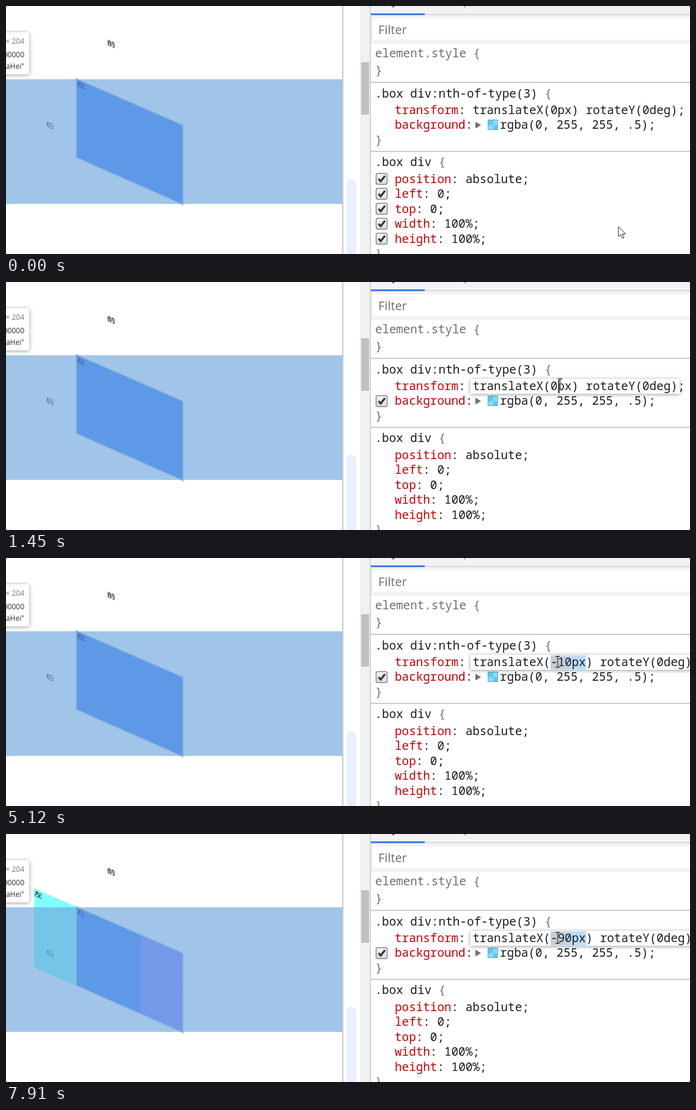
An HTML page for the animation above (8000 ms loop, 1119 px wide and 406 px high).

```html
<!DOCTYPE html>
<html lang="en">
<head>
<meta charset="utf-8">
<title>Moving a cube face in the style inspector</title>
<style>
html, body { margin: 0; width: 100%; height: 100%; overflow: hidden; background: #fff; }
svg { display: block; }
.code { font: 19.3px "Noto Sans Mono", "DejaVu Sans Mono", monospace; fill: #1c1c1c; }
.prop { fill: #c80000; }
.dim { fill: #6e6e6e; }
.ui { font-family: "Open Sans", "Noto Sans", sans-serif; }
.face { font: 16px "Noto Sans CJK SC", "Noto Sans CJK", sans-serif; }
.pop { filter: drop-shadow(0 1px 3px rgba(0, 0, 0, .4)); }

/* One 8 s clock; every change is a hard step. 1% = 80 ms */
.a { animation: 8s step-end infinite; }
.hover-low { animation-name: hover-low; }
.hover-top { animation-name: hover-top; }
.hover-bg { animation-name: hover-bg; }
.edit { animation-name: edit; }
.edit-box { animation-name: edit-box; }
.all { animation-name: all; }
.caret { animation-name: caret; }
.part { animation-name: part; }
.before { animation-name: before; }
.after { animation-name: after; }
.tip { animation-name: tip; }
.plane { animation-name: plane; }
.digits { animation-name: digits; }
.pointer { animation-name: pointer; }
.arrow { animation-name: arrow; }
.beam { animation-name: beam; }

@keyframes hover-low { 0% { opacity: 1 } 3.7125%, 100% { opacity: 0 } }
@keyframes hover-top { 0% { opacity: 0 } 3.7125% { opacity: 1 } 9.375%, 100% { opacity: 0 } }
@keyframes hover-bg { 0% { opacity: 0 } 3.7125%, 100% { opacity: 1 } }
@keyframes edit { 0% { opacity: 0 } 9.375%, 100% { opacity: 1 } }
@keyframes edit-box { 0% { width: 342px } 64%, 100% { width: 368px } }
@keyframes all { 0% { opacity: 0 } 9.375% { opacity: 1 } 17.375%, 100% { opacity: 0 } }
@keyframes caret { 0% { opacity: 0 } 17.375% { opacity: 1 } 20.25%, 100% { opacity: 0 } }
@keyframes part { 0% { opacity: 0 } 20.25%, 100% { opacity: 1 } }
@keyframes before { 0% { opacity: 1 } 64%, 100% { opacity: 0 } }
@keyframes after { 0% { opacity: 0 } 64%, 100% { opacity: 1 } }
@keyframes tip {
  0% { opacity: 0 } 33% { opacity: .5 } 33.875% { opacity: 1 }
  46.5% { opacity: .5 } 47.5%, 100% { opacity: 0 }
}
@keyframes plane {
  0% { transform: none }
  65% { transform: translate(-8.65px, -3.75px) }
  70.625% { transform: translate(-17.3px, -7.5px) }
  74.75% { transform: translate(-25.95px, -11.25px) }
  79.625% { transform: translate(-34.6px, -15px) }
  83.375% { transform: translate(-43.25px, -18.75px) }
  87.25% { transform: translate(-51.9px, -22.5px) }
  92.25% { transform: translate(-60.55px, -26.25px) }
  95.125%, 100% { transform: translate(-69.2px, -30px) }
}
@keyframes digits {
  0% { transform: none }
  70.625% { transform: translateY(-30px) }
  74.75% { transform: translateY(-60px) }
  78.5% { transform: translateY(-90px) }
  82.5% { transform: translateY(-120px) }
  87.25% { transform: translateY(-150px) }
  91.125% { transform: translateY(-180px) }
  95.125% { transform: translateY(-210px) }
  98.875%, 100% { transform: translateY(-240px) }
}
@keyframes pointer {
  0% { transform: translate(1002px, 361px) }
  .875% { transform: translate(996px, 345px) }
  1.825% { transform: translate(980px, 310px) }
  2.7625% { transform: translate(960px, 268px) }
  3.7125% { transform: translate(940px, 232px) }
  4.6625% { transform: translate(925px, 204px) }
  5.6125% { transform: translate(914px, 187px) }
  6.55% { transform: translate(907px, 175px) }
  7.5% { transform: translate(903.5px, 171px) }
  18.125% { transform: translate(906.5px, 167.5px) }
  26.125%, 100% { transform: translate(902.5px, 170px) }
}
@keyframes arrow { 0% { opacity: 1 } 4.6625%, 100% { opacity: 0 } }
@keyframes beam { 0% { opacity: 0 } 4.6625%, 100% { opacity: 1 } }
</style>
</head>
<body>
<svg width="1119" height="406" viewBox="0 0 1119 406">
  <defs>
    <linearGradient id="shade" x2="0" y2="1">
      <stop stop-color="#f6f6f6"/><stop offset="1" stop-color="#dcdcdc"/>
    </linearGradient>
    <g id="check">
      <rect x="-9" y="-9" width="18" height="18" rx="3" fill="url(#shade)" stroke="#858585" stroke-width="1.5"/>
      <path d="M-5 0L-1.5 4L5.5-5" fill="none" stroke="#333" stroke-width="3.2"/>
    </g>
    <path id="quad" d="M115 119L289.5 195V325L115 248Z"/>
    <path id="bar" d="M-3.5-9H-1L0-8L1-9H3.5M0-8V8M-3.5 9H-1L0 8L1 9H3.5"/>
  </defs>

  <!-- page preview -->
  <g class="face">
    <text transform="matrix(.87 .38 0 .645 65 185)" y="17">后</text>
    <g class="a plane">
      <use href="#quad" fill="#0ff" fill-opacity=".5"/>
      <text transform="matrix(.87 .38 0 .645 115 119)" y="17">左</text>
    </g>
    <use href="#quad" fill="#00f" fill-opacity=".5"/>
    <text transform="matrix(.87 .38 0 .645 115 119)" y="17">右</text>
    <text transform="matrix(.87 .38 0 .645 165 52)" y="17">前</text>
  </g>
  <rect y="120" width="550" height="204" fill="#6fa8dc" fill-opacity=".66"/>
  <use href="#quad" fill="none" stroke="#8ab4dc" stroke-opacity=".9" stroke-width="1.8"/>

  <g class="ui" font-size="12" text-anchor="end" fill="#333">
    <rect class="pop" x="-20" y="43" width="58" height="69" rx="3" fill="#fff"/>
    <text x="30" y="62" fill="#777">× 204</text>
    <text x="30" y="84">#000000</text>
    <text x="30" y="103">aHei"</text>
  </g>

  <!-- panel frame -->
  <rect x="550" width="2" height="406" fill="#c9c9c9"/>
  <rect x="557" y="283" width="16" height="140" rx="8" fill="#e9f0fd"/>
  <rect x="579" width="17" height="406" fill="#f1f1f1"/>
  <rect x="581" y="92" width="13" height="86" fill="#c1c1c1"/>
  <rect x="597" width="522" height="62" fill="#f3f3f3"/>
  <rect x="595.5" width="1.5" height="406" fill="#c8c8c8"/>
  <g class="ui" font-size="19" fill="#333">
    <text x="614" y="-2">Styles</text>
    <text x="707" y="-2" class="dim">Computed</text>
  </g>
  <path d="M597 14H1119" stroke="#ccc" stroke-width="1.5"/>
  <rect x="597" y="12" width="88" height="3" fill="#3b7fe8"/>
  <rect x="601" y="20" width="518" height="35" fill="#fff"/>
  <text class="ui" x="609" y="46" font-size="20" fill="#6e6e6e">Filter</text>
  <path d="M597 125H1119M597 238H1119" stroke="#ccc" stroke-width="2"/>

  <!-- rules -->
  <g class="code">
    <text x="604" y="84" class="dim" font-size="19.1">element.style {</text>
    <text x="604" y="112" class="dim">}</text>
    <text x="603.5" y="150">.box div:nth-of-type(3) <tspan class="dim">{</tspan></text>
    <text x="636" y="177"><tspan class="prop">transform</tspan>:</text>
    <text x="636" y="201"><tspan class="prop">background</tspan>:</text>
    <path d="M768 189.5L777 195L768 200.5Z" class="dim"/>
    <rect x="788.5" y="186.5" width="16" height="16" fill="#86def8" stroke="#64a9cc"/>
    <path d="M789 187h8v8h-8zM797 195h7v7h-7z" fill="#62c8ee"/>
    <text x="808" y="201">rgba(0, 255, 255, .5);</text>
    <text x="604" y="226" class="dim">}</text>
    <text x="603.5" y="262">.box div <tspan class="dim">{</tspan></text>
    <text x="636" y="290"><tspan class="prop">position</tspan>: absolute;</text>
    <text x="636" y="314"><tspan class="prop">left</tspan>: 0;</text>
    <text x="636" y="339"><tspan class="prop">top</tspan>: 0;</text>
    <text x="636" y="363"><tspan class="prop">width</tspan>: 100%;</text>
    <text x="636" y="388"><tspan class="prop">height</tspan>: 100%;</text>
    <text x="604" y="411.5" class="dim">}</text>
  </g>

  <g class="a hover-low">
    <use href="#check" x="614.5" y="283"/>
    <use href="#check" x="614.5" y="307.5"/>
    <use href="#check" x="614.5" y="332"/>
    <use href="#check" x="614.5" y="356.5"/>
    <use href="#check" x="614.5" y="381"/>
  </g>
  <use class="a hover-top" href="#check" x="614.5" y="171"/>
  <use class="a hover-bg" href="#check" x="614.5" y="195"/>

  <!-- edited value -->
  <g class="a edit">
    <g class="pop"><rect class="a edit-box" x="760" y="158.5" width="342" height="24.5" fill="#fff"/></g>
  </g>
  <rect class="a all" x="764" y="159" width="335.5" height="24" fill="#badbfb"/>
  <g class="a part">
    <rect x="891" y="159.5" width="26" height="23" fill="#c6cfd6"/>
    <rect x="917" y="159.5" width="9" height="23" fill="#c3d6e8"/>
  </g>
  <rect class="a after" x="917" y="159.5" width="32" height="23" fill="#badbfb"/>
  <g class="code">
    <text class="a before" x="763.4" y="177">translateX(0px) rotateY(0deg);</text>
    <g class="a after">
      <text x="763.4" y="177">translateX(-</text>
      <svg x="902.4" y="159" width="11.6" height="24" overflow="hidden">
        <g class="a digits">
          <text y="18">1</text><text y="48">2</text><text y="78">3</text>
          <text y="108">4</text><text y="138">5</text><text y="168">6</text>
          <text y="198">7</text><text y="228">8</text><text y="258">9</text>
        </g>
      </svg>
      <text x="913.9" y="177">0px) rotateY(0deg)</text>
    </g>
  </g>
  <rect class="a caret" x="903.5" y="160" width="1.5" height="21" fill="#111"/>

  <g class="a tip">
    <rect class="pop" x="921" y="184.5" width="260" height="42" fill="#f1f1f1" stroke="#bdbdbd"/>
    <text class="ui" x="933.5" y="214" font-size="19.5" fill="#4c4c4c">Increment/decrement</text>
  </g>

  <g class="a pointer">
    <path class="a arrow" d="M0 0V16.5L3.8 13L6.5 19.2L9 18.1L6.3 12.1H11.5Z" fill="#fff" stroke="#222"/>
    <g class="a beam" fill="none">
      <use href="#bar" stroke="#fff" stroke-opacity=".6" stroke-width="2.4"/>
      <use href="#bar" stroke="#222" stroke-width="1.3"/>
    </g>
  </g>
</svg>
</body>
</html>
```
